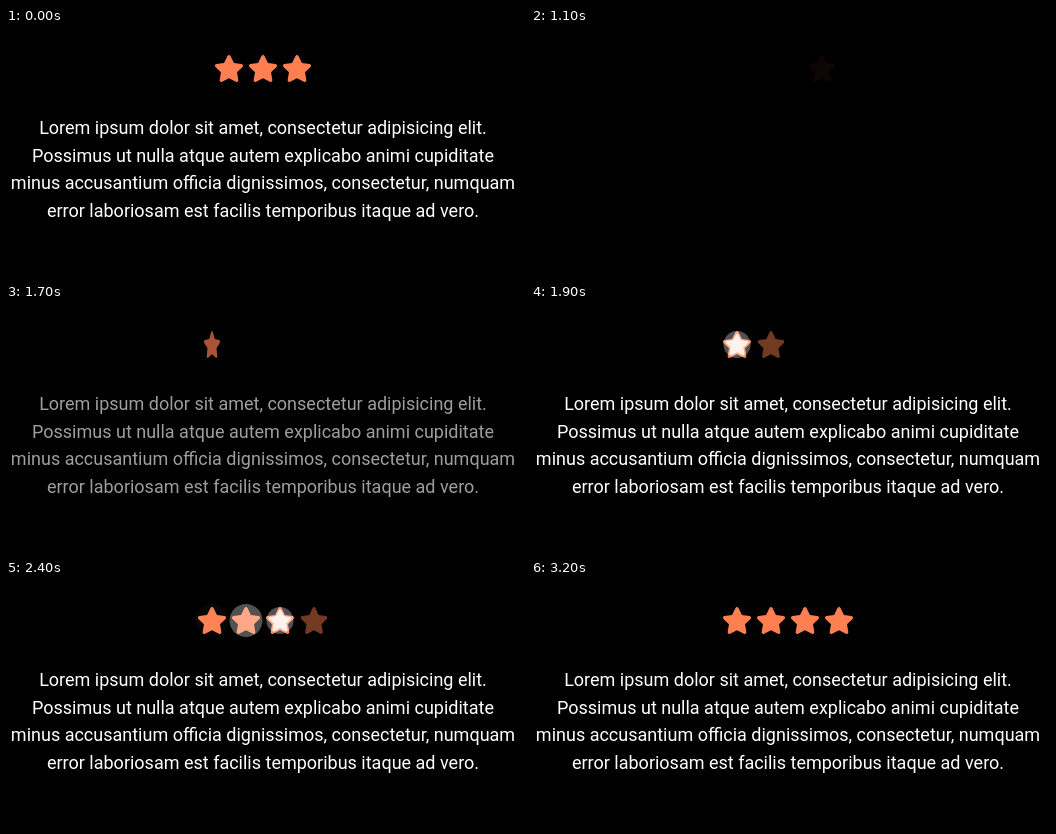
Recreate the animation shown at these times as an HTML page. Size 519 px wide and 248 px high, loop 8 s.

```html
<!DOCTYPE html>
<html lang="en">
<head>
<meta charset="utf-8">
<title>Star rating</title>
<style>
  html, body { margin: 0; width: 100%; height: 100%; overflow: hidden; background: #000; }
  svg { display: block; width: 100%; height: 100%; }
  text { font: 18px Roboto, sans-serif; fill: #fff; text-anchor: middle; }
</style>
</head>
<body>
<svg viewBox="0 0 519 248">
  <defs>
    <path id="star" transform="scale(.0527) translate(-288 -256)" d="M259.3 17.8L194 150.2 47.9 171.5c-26.2 3.8-36.7 36.1-17.7 54.6l105.7 103-25 145.5c-4.5 26.3 23.2 46 46.4 33.7L288 439.6l130.7 68.7c23.2 12.2 50.9-7.4 46.4-33.7l-25-145.5 105.7-103c19-18.5 8.5-50.8-17.7-54.6L382 150.2 316.7 17.8c-11.7-23.6-45.6-23.9-57.4 0z"/>
  </defs>
  <g id="stars"></g>
  <g id="copy">
    <text x="257" y="106">Lorem ipsum dolor sit amet, consectetur adipisicing elit.</text>
    <text x="257" y="134">Possimus ut nulla atque autem explicabo animi cupiditate</text>
    <text x="257" y="161">minus accusantium officia dignissimos, consectetur, numquam</text>
    <text x="257" y="189">error laboriosam est facilis temporibus itaque ad vero.</text>
  </g>
</svg>
<script>
const LOOP = 8000, TICK = 100, PITCH = 34, MID = 257, ROW = 40.5;
const OUT = { start: 25, gap: 300, time: 500 };
const IN = { start: 1543, gap: 250, time: 240 };
const RIPPLE = 640;

const clamp = v => Math.max(0, Math.min(1, v));
const copy = document.getElementById('copy');
const row = document.getElementById('stars');

function add(parent, tag, attrs) {
  const el = document.createElementNS('http://www.w3.org/2000/svg', tag);
  set(el, attrs);
  return parent.appendChild(el);
}

function set(el, attrs) {
  for (const key in attrs) el.setAttribute(key, attrs[key]);
}

const stars = Array.from({ length: 4 }, () => {
  const box = add(row, 'g', {});
  return {
    box,
    body: add(box, 'use', { href: '#star', fill: '#ff7f50' }),
    flash: add(box, 'use', { href: '#star', fill: '#fff' }),
    disc: add(box, 'circle', { fill: '#fff' })
  };
});

// One full turn about the vertical axis, tied to the fade.
function flip(star, p, opacity) {
  const width = Math.abs(Math.cos(p * 2 * Math.PI));
  set(star.body, { transform: `scale(${width} 1)`, opacity });
}

function ripple(star, q) {
  const live = q > 0 && q < 1;
  const rise = clamp(q / 0.12);
  set(star.disc, {
    r: 16.5 * Math.min(1, 0.6 + q * 1.2),
    opacity: live ? 0.32 * rise * clamp((1 - q) / 0.43) : 0
  });
  set(star.flash, {
    transform: `scale(${0.72 + 0.4 * clamp(q)})`,
    opacity: live ? 0.85 * rise * clamp(1 - (q - 0.18) / 0.35) : 0
  });
}

function draw(now) {
  const t = Math.floor((now % LOOP) / TICK) * TICK;
  const leaving = t < 1600;
  const count = leaving ? 3 : 4;

  stars.forEach((star, i) => {
    const x = MID + (i - (count - 1) / 2) * PITCH;
    set(star.box, {
      transform: `translate(${x} ${ROW})`,
      visibility: i < count ? 'visible' : 'hidden'
    });
    if (leaving) {
      const p = t < 500 ? 0 : clamp((Math.min(t, 1100) - OUT.start - i * OUT.gap) / OUT.time);
      flip(star, p, 1 - p);
      ripple(star, 0);
    } else {
      const age = t - IN.start - i * IN.gap;
      const p = clamp(age / IN.time);
      flip(star, p, p);
      ripple(star, (age - IN.time) / RIPPLE);
    }
  });

  const fade = t < 500 ? 1 : leaving ? clamp((530 - t) / 500) : clamp((t - 1452) / 400);
  set(copy, { opacity: fade });
}

let begin;
function frame(now) {
  begin ??= now;
  draw(now - begin);
  requestAnimationFrame(frame);
}
draw(0);
requestAnimationFrame(frame);
</script>
</body>
</html>
```
